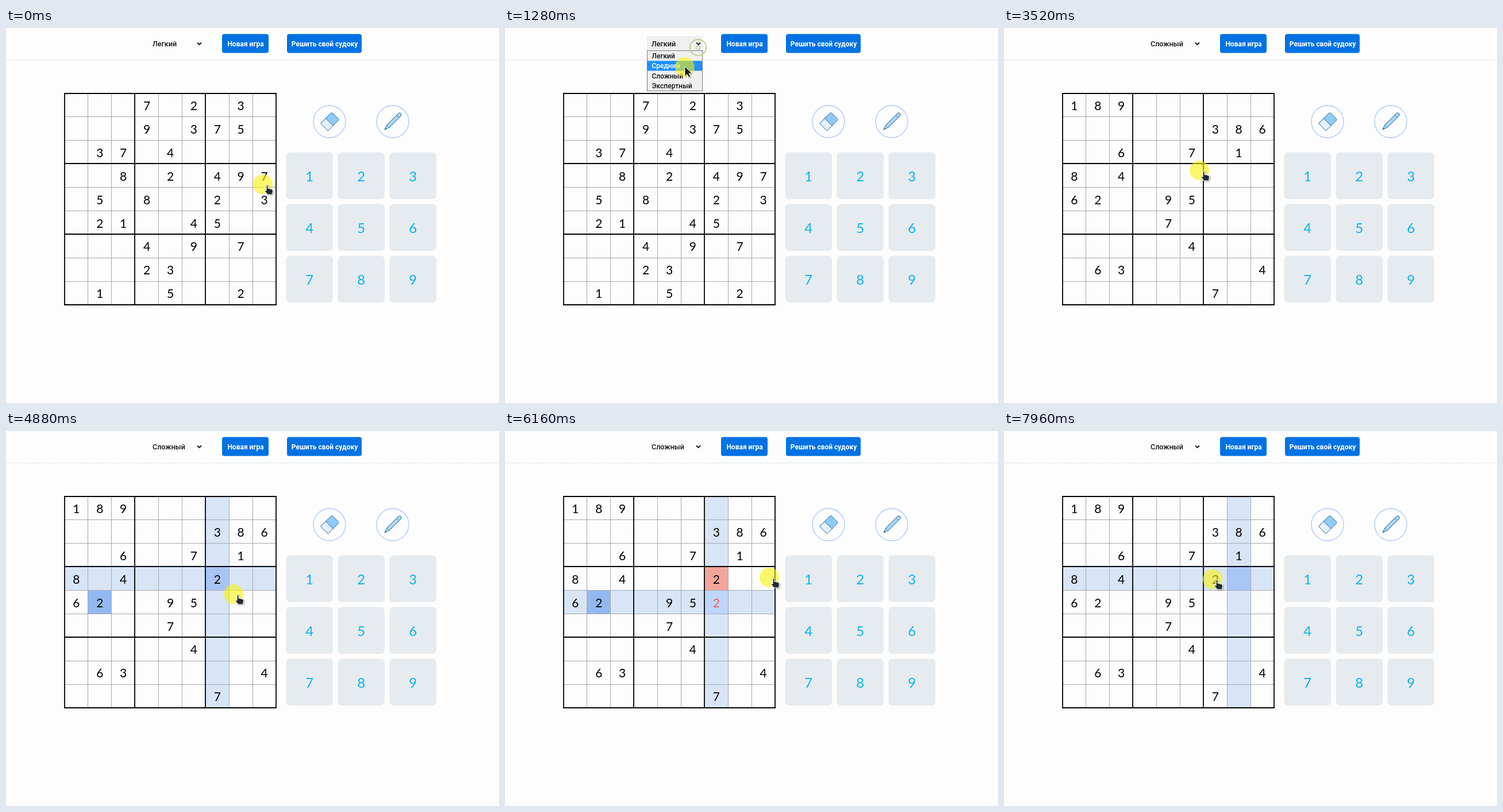
Animation of 858 by 653 pixels, one loop 8 s. Source, as an HTML page with a canvas:

```html
<!DOCTYPE html>
<html lang="ru">
<head>
<meta charset="utf-8">
<title>Судоку</title>
<style>
  html, body { margin: 0; width: 100%; height: 100%; overflow: hidden; background: #fdfdfd; }
  canvas { display: block; }
</style>
</head>
<body>
<canvas id="stage" width="858" height="653"></canvas>
<script>
const ctx = document.getElementById('stage').getContext('2d');
const LOOP = 8000, STEP = 40;
const LEFT = 102, TOP = 114, CELL = 40.9;
const UI = 'Roboto, "Open Sans", sans-serif';
const DIGITS = 'Lato, "Open Sans", sans-serif';
const LEVELS = ['Легкий', 'Средний', 'Сложный', 'Экспертный'];
const EASY = ['...7.2.3.', '...9.375.', '.37.4....', '..8.2.497', '.5.8..2.3',
              '.21..45..', '...4.9.7.', '...23....', '.1..5..2.'];
const HARD = ['189......', '......386', '..6..7.1.', '8.4......', '62..95...',
              '....7....', '.....4...', '.63.....4', '......7..'];

// Moments of the clicks and of what they cause
const at = { open: 1000, choose: 1640, fresh: 2600, select: 3800, place: 4450,
             selectBelow: 5060, wrong: 5660, erase: 7080, selectNext: 7560 };

// Pointer path: time, x, y
const path = [
  [0, 447, 272], [920, 336, 33], [1080, 336, 33], [1280, 313, 68], [1480, 290, 84],
  [1680, 290, 84], [2100, 397, 28], [3000, 397, 28], [3520, 340, 248], [3700, 363, 258],
  [3900, 363, 258], [4350, 612, 258], [4600, 612, 258], [4880, 396, 284], [5000, 366, 297],
  [5160, 366, 297], [5560, 612, 258], [5800, 612, 258], [6160, 460, 255], [6400, 366, 297],
  [6600, 366, 297], [7000, 560, 162], [7150, 560, 162], [7480, 405, 258], [7680, 405, 258],
  [7960, 363, 258]
];

function pointer(t) {
  const i = path.findIndex(p => p[0] > t);
  if (i < 0) return path[path.length - 1].slice(1);
  const [t0, x0, y0] = path[i - 1], [t1, x1, y1] = path[i];
  const u = (t - t0) / (t1 - t0), e = u * u * (3 - 2 * u);
  return [x0 + (x1 - x0) * e, y0 + (y1 - y0) * e];
}

function box(x, y, w, h, r, fill) {
  ctx.beginPath();
  ctx.roundRect(x, y, w, h, r);
  ctx.fillStyle = fill;
  ctx.fill();
}

function text(s, x, y, font, color, align = 'left') {
  ctx.font = font;
  ctx.fillStyle = color;
  ctx.textAlign = align;
  ctx.fillText(s, x, y);
}

function shape(d, fill, stroke, width = 1) {
  const p = new Path2D(d);
  if (fill) { ctx.fillStyle = fill; ctx.fill(p); }
  if (stroke) { ctx.strokeStyle = stroke; ctx.lineWidth = width; ctx.stroke(p); }
}

function ring(x, y, r, color, width) {
  ctx.beginPath();
  ctx.arc(x, y, r, 0, 7);
  ctx.strokeStyle = color;
  ctx.lineWidth = width;
  ctx.stroke();
}

function within(x, y, l, t, w, h) {
  return x >= l && x <= l + w && y >= t && y <= t + h;
}

function header(t, x, y) {
  ctx.setLineDash([2, 1]);
  shape('M0 55.5H858', null, '#d3dbe1');
  ctx.setLineDash([]);

  if (t >= at.open && t < at.choose) box(247, 14, 97, 26, 3, '#efefef');
  text(LEVELS[t < at.choose ? 0 : 2], 255, 31.5, '500 12.5px ' + UI, '#111');
  shape('M333 25.5l3.5 3.5l3.5-3.5', null, '#111', 1.8);

  const hover = within(x + 5, y, 376, 10, 81, 34);
  box(376, 10.5, 81, 33, 4, hover ? '#0059b0' : '#0072e3');
  box(489, 10.5, 130, 33, 4, '#0072e3');
  text('Новая игра', 417, 32, 'bold 12px ' + UI, '#fff', 'center');
  text('Решить свой судоку', 554.5, 32, 'bold 12px ' + UI, '#fff', 'center');
}

function dropdown(y) {
  const current = Math.max(0, Math.min(3, Math.floor((y - 40) / 17.3)));
  box(247, 39, 97, 71, 0, '#7b7b7b');
  box(248, 40, 95, 69, 0, '#f0f0f0');
  LEVELS.forEach((name, i) => {
    if (i === current) box(248, 40 + i * 17.3, 95, 17.3, 0, '#1e90ff');
    text(name, 255.5, 53 + i * 17.3, '500 12px ' + UI, i === current ? '#fff' : '#111');
  });
}

function boardState(t) {
  const rows = (t < at.fresh ? EASY : HARD).map(r => [...r]);
  if (t >= at.place) rows[3][6] = '2';
  const error = t >= at.wrong && t < at.erase;
  if (error) rows[4][6] = '2';
  const picked = t < at.select ? null : t < at.selectBelow ? [3, 6]
               : t < at.selectNext ? [4, 6] : [3, 7];
  return { rows, error, picked };
}

function cellColor({ rows, error, picked }, r, c) {
  if (!picked) return null;
  const [pr, pc] = picked, value = rows[pr][pc];
  if (r === pr && c === pc) return error ? '#bdd6fa' : '#a9c5f5';
  if (value !== '.' && rows[r][c] === value) return error && r === 3 ? '#f2a59a' : '#92b8f0';
  return r === pr || c === pc ? '#d7e5f6' : null;
}

function board(t) {
  const state = boardState(t);
  for (let r = 0; r < 9; r++) for (let c = 0; c < 9; c++) {
    const x = LEFT + c * CELL, y = TOP + r * CELL, color = cellColor(state, r, c);
    if (color) box(x, y, CELL, CELL, 0, color);
    const digit = state.rows[r][c];
    if (digit !== '.') {
      const wrong = state.error && r === 4 && c === 6;
      text(digit, x + 20.4, y + 29, '21px ' + DIGITS, wrong ? '#f05a50' : '#000', 'center');
    }
  }
  for (const thick of [false, true]) for (let i = 0; i <= 9; i++) {
    if ((i % 3 === 0) !== thick) continue;
    const snap = v => Math.floor(v) + (thick ? 0 : .5);
    const x = snap(LEFT + i * CELL), y = snap(TOP + i * CELL);
    shape(`M${x} 113V483M101 ${y}H471`, null, thick ? '#000' : '#a8a8b0', thick ? 1.8 : 1);
  }
}

function tools() {
  for (const x of [563, 673]) ring(x, 163, 28, '#bfd4fa', 1.8);
  ctx.lineJoin = 'round';

  ctx.save();
  ctx.translate(563.5, 163);
  ctx.rotate(-Math.PI / 4);
  shape('M-13.5-9H1V9H-13.5Z', '#e4f1fd', '#4f86b5', 1);
  shape('M-1-9H12Q14-9 14-7V7Q14 9 12 9H-1Z', '#90cbf8', '#4f86b5', 1);
  ctx.restore();

  ctx.save();
  ctx.translate(673, 163);
  ctx.rotate(-Math.PI / 4);
  shape('M-20 0L-12-3H17Q20-3 20 0Q20 3 17 3H-12Z', '#a9d8fa', '#41779f');
  shape('M-12-3V3M13-3V3', null, '#41779f', .8);
  shape('M-20 0l4-1.6v3.2Z', '#41779f');
  ctx.restore();
  ctx.lineJoin = 'miter';

  for (let i = 0; i < 9; i++) {
    const x = 487.5 + i % 3 * 90, y = 216.5 + Math.floor(i / 3) * 90;
    box(x, y, 81.5, 81.5, 7, '#e6ebef');
    text(i + 1, x + 40.7, y + 50, '24px ' + DIGITS, '#0cb2f0', 'center');
  }
}

function ripples(t) {
  for (const name in at) {
    const start = at[name] - (name === 'fresh' ? 120 : 0), age = t - start;
    const life = name === 'open' ? at.choose - at.open : 240;
    if (age < 0 || age >= life) continue;
    const [x, y] = pointer(start);
    ring(x, y + 1, 3 + 11 * Math.min(1, age / 200), '#b4d68c', 2);
    ring(x, y + 1, 3, '#b4d68c', 1.5);
  }
}

function cursor(x, y) {
  ctx.beginPath();
  ctx.arc(x, y, 17, 0, 7);
  ctx.fillStyle = 'rgba(250,243,0,.58)';
  ctx.fill();

  const px = x + 5;
  const hand = within(px, y, 101, 113, 370, 370) || within(px, y, 487, 216, 262, 262) ||
    within(px, y, 376, 10, 81, 34) || Math.hypot(px - 563, y - 163) < 28;
  ctx.save();
  ctx.lineJoin = 'round';
  ctx.shadowColor = 'rgba(0,0,0,.3)';
  ctx.shadowBlur = 2;
  ctx.shadowOffsetX = ctx.shadowOffsetY = 1;
  if (hand) {
    ctx.translate(x + 2, y);
    shape('M4 2Q5.5 0 7 2V7L13 8.5Q16 9 15.5 12L14.5 18H6L1 11.5Q1 9.5 4 11Z', '#222a33', '#fff', 1.2);
  } else {
    ctx.translate(x, y - 1);
    shape('M0 0V17L4 13.4L6.8 19L9.6 17.6L7 12.3H12.5Z', '#111', '#fff', 1);
  }
  ctx.restore();
}

function draw(t) {
  const [x, y] = pointer(t);
  ctx.fillStyle = '#fdfdfd';
  ctx.fillRect(0, 0, 858, 653);
  header(t, x, y);
  board(t);
  tools();
  if (t >= at.open && t < at.choose) dropdown(y);
  ripples(t);
  cursor(x, y);
}

const begin = performance.now();
function tick() {
  const t = (performance.now() - begin) % LOOP;
  draw(Math.floor(t / STEP) * STEP);
  requestAnimationFrame(tick);
}
tick();
</script>
</body>
</html>
```
